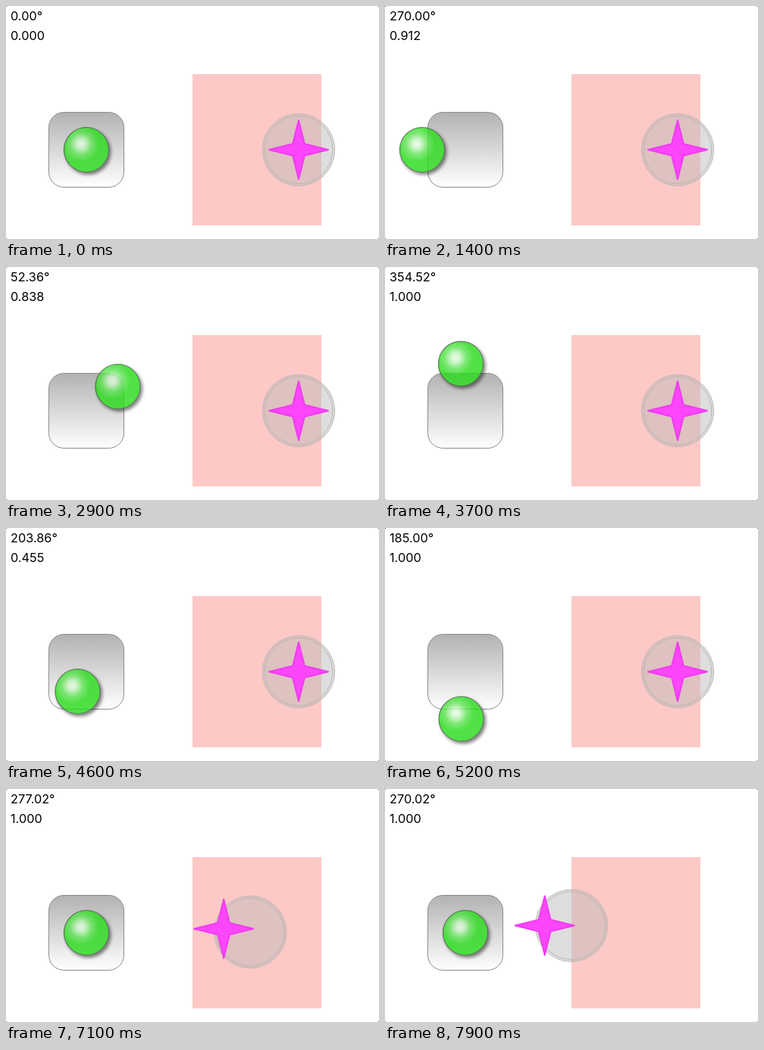
These frames come from a looping animation (492x308 px, 8000 ms). An HTML page:

```html
<!DOCTYPE html>
<html lang="en">
<head>
<meta charset="utf-8">
<title>Two joysticks</title>
<style>
  html, body { margin: 0; width: 100%; height: 100%; overflow: hidden; background: #777; }
  svg { display: block; width: 492px; height: 308px; }
  text { font: 16.3px Inter, sans-serif; fill: #000; }
</style>
</head>
<body>
<svg viewBox="0 0 492 308">
  <defs>
    <linearGradient id="plate" x2="0" y2="1">
      <stop offset="0" stop-color="#b2b2b2"/>
      <stop offset="1" stop-color="#fff"/>
    </linearGradient>
    <radialGradient id="gloss" cx=".38" cy=".37" r=".4">
      <stop offset="0" stop-color="#e9fce7"/>
      <stop offset=".25" stop-color="#c8f5c4"/>
      <stop offset=".6" stop-color="#62e457"/>
      <stop offset="1" stop-color="#2bdc1e"/>
    </radialGradient>
    <filter id="shadow" x="-30%" y="-30%" width="160%" height="160%">
      <feDropShadow dx="2.5" dy="3" stdDeviation="2.2" flood-color="#000" flood-opacity=".6"/>
    </filter>
  </defs>
  <rect width="492" height="308" rx="2.5" fill="#fff"/>
  <rect x="246" y="90" width="170" height="200" fill="#fcc9c6"/>
  <rect x="56.5" y="140.5" width="99" height="99" rx="20" fill="url(#plate)" stroke="#8c8c8c"/>
  <g id="ball" opacity=".82">
    <circle r="29.5" fill="url(#gloss)" stroke="#3f5a3f" stroke-width="1.2" filter="url(#shadow)"/>
  </g>
  <g id="base" stroke="#bcb5b5">
    <circle r="47.6" fill="#b9b9b9" fill-opacity=".47"/>
    <circle r="44.8" fill="none"/>
  </g>
  <path id="star" d="M0-39 7.8-7.8 39 0 7.8 7.8 0 39-7.8 7.8-39 0-7.8-7.8Z"
    fill="#fc46fc" stroke="#f03cf0" stroke-width="2" stroke-linejoin="round"/>
  <text id="angle" x="6" y="18.8"></text>
  <text id="force" x="6" y="44.8"></text>
</svg>
<script>
const LOOP = 8000, STEP = 100;
const BALL_REACH = 62.5, STAR_REACH = 35.3;
const RELEASE = 5500, SECOND_TOUCH = 6300, SECOND_END = 7900;
const $ = id => document.getElementById(id);
const clamp = v => Math.min(1, Math.max(0, v));

// Heading in degrees clockwise from up
function polar(deg, pull) {
  const a = deg * Math.PI / 180;
  return [pull * Math.sin(a), -pull * Math.cos(a)];
}

// Turning points of the first drag: time, heading, pull
const drag = [
  [300, 0, 0], [1150, 270, 1], [1400, 270, .912], [2300, 90, 1],
  [2900, 52.36, .838], [3700, 354.52, 1.08], [4600, 203.86, .455], [4900, 185, 1.05]
].map(([t, deg, pull]) => [t, ...polar(deg, pull)]);

// Monotone cubic interpolation, so the path never overshoots its keys
function track(keys, t) {
  const last = keys.length - 1;
  if (t <= keys[0][0]) return keys[0].slice(1);
  if (t >= keys[last][0]) return keys[last].slice(1);
  const i = keys.findIndex(k => k[0] > t) - 1;
  const span = keys[i + 1][0] - keys[i][0], u = (t - keys[i][0]) / span, v = 1 - u;
  return [1, 2].map(c => {
    const slope = j => j < 0 || j >= last ? 0 :
      (keys[j + 1][c] - keys[j][c]) / (keys[j + 1][0] - keys[j][0]);
    const tangent = j => {
      const a = slope(j - 1), b = slope(j);
      return a * b > 0 ? 2 * a * b / (a + b) : 0;
    };
    return keys[i][c] * (1 + 2 * u) * v * v + keys[i + 1][c] * u * u * (3 - 2 * u) +
      span * u * v * (tangent(i) * v - tangent(i + 1) * u);
  });
}

function limit([x, y]) {
  const k = Math.max(1, Math.hypot(x, y));
  return [x / k, y / k];
}

const place = (id, x, y) => $(id).setAttribute("transform", `translate(${x} ${y})`);

function draw(t) {
  const ball = t < RELEASE ? limit(track(drag, t)) : [0, 0];
  place("ball", 106 + ball[0] * BALL_REACH, 190 + ball[1] * BALL_REACH);

  // The star reaches full pull first, then tows its base to the left
  const u = clamp((t - SECOND_TOUCH) / (SECOND_END - SECOND_TOUCH));
  const star = polar(270.02 + 7 * Math.sin(Math.PI * u), clamp(4 * u));
  const tow = 1 - (1 - clamp((u - .25) / .75)) ** 1.5;
  const x = 386 - 140 * tow, y = 190 - 9.4 * tow ** 3;
  place("base", x, y);
  place("star", x + star[0] * STAR_REACH, y + star[1] * STAR_REACH);

  const [dx, dy] = t < SECOND_TOUCH ? ball : star;
  const pull = Math.hypot(dx, dy);
  const deg = pull < 1e-6 ? 0 : (Math.atan2(dx, -dy) * 180 / Math.PI + 360) % 360;
  $("angle").textContent = deg.toFixed(2) + "°";
  $("force").textContent = pull.toFixed(3);
}

const start = performance.now();
function tick() {
  const t = (performance.now() - start) % LOOP;
  draw(Math.floor(t / STEP) * STEP);
  requestAnimationFrame(tick);
}
tick();
</script>
</body>
</html>
```
